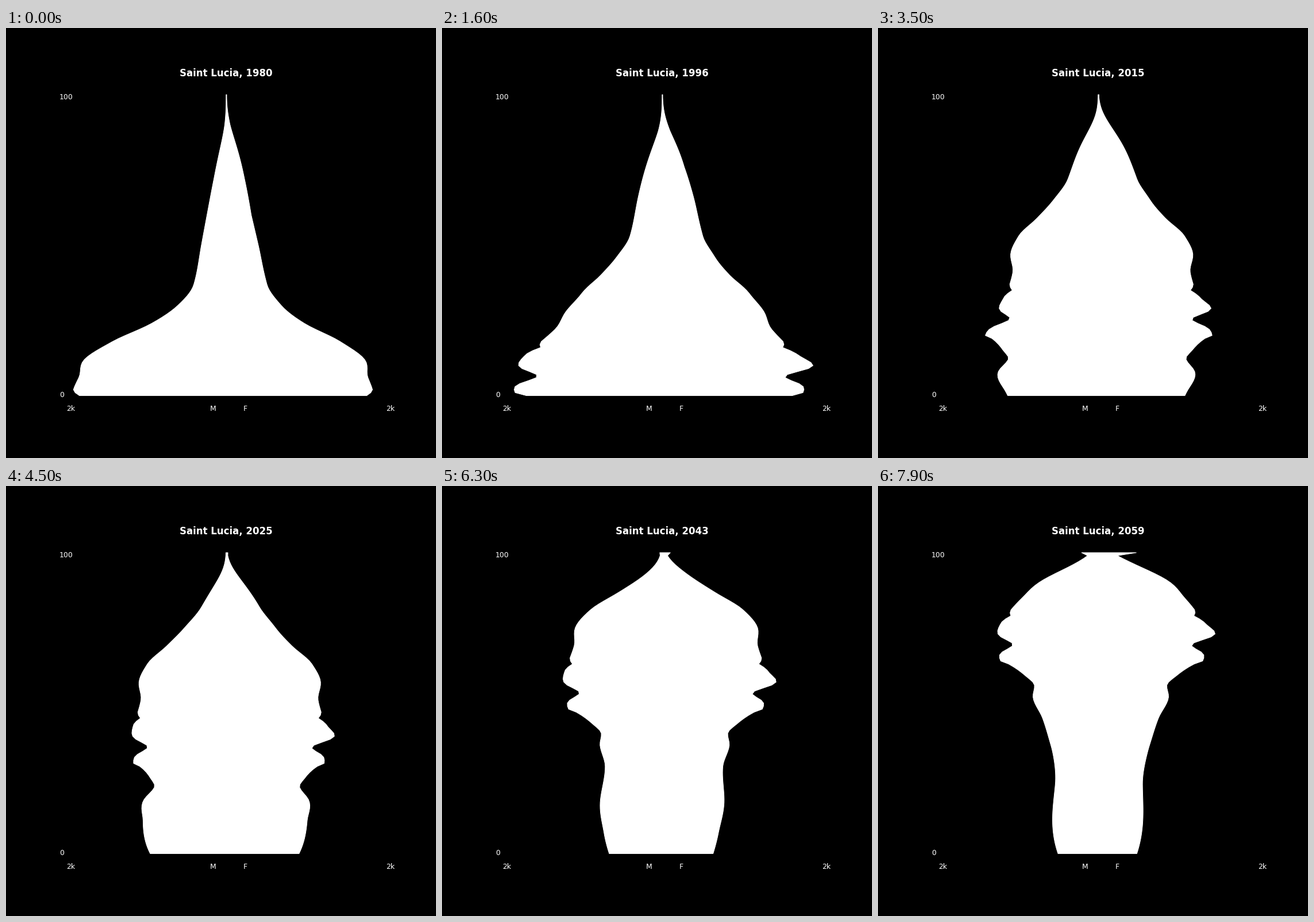
These frames come from a looping animation (748x748 px, 8 s). A matplotlib script:

```python
import numpy as np
import matplotlib.pyplot as plt
from matplotlib.animation import FuncAnimation

SIZE, DPI = 748, 100
FIRST, YEARS, STEP_MS = 1980, 80, 100
MID = 383.3                   # x of the axis between the sexes
Y0, DY = 639.55, 5.236        # y of age 0, pixels per year of age
AGES = np.arange(111)         # ages from 100 on share one open group
LEVELS = Y0 - DY * np.arange(101)

# Boys born per year, in pixels of width
BIRTHS = np.array([
    (1890, 26), (1910, 48), (1930, 80), (1943, 104), (1950, 147), (1956, 198),
    (1962, 256), (1968, 278), (1974, 264), (1985, 273), (1995, 256),
    (1996, 236), (2000, 195), (2003, 175), (2007, 183), (2014, 160),
    (2025, 132), (2036, 100), (2059, 63)], float)


def smooth(x, xp, fp):
    """Monotone cubic interpolation."""
    h = np.diff(xp)
    d = np.diff(fp) / h
    m = np.empty(len(xp))
    m[0], m[-1] = d[0], d[-1]
    same = d[:-1] * d[1:] > 0
    total = np.where(same, d[:-1] + d[1:], 1)
    m[1:-1] = np.where(same, 2 * d[:-1] * d[1:] / total, 0)
    i = np.clip(np.searchsorted(xp, x, "right") - 1, 0, len(h) - 1)
    s = (x - xp[i]) / h[i]
    return ((1 + 2 * s) * (1 - s) ** 2 * fp[i] + s * (1 - s) ** 2 * h[i] * m[i]
            + s * s * (3 - 2 * s) * fp[i + 1] - s * s * (1 - s) * h[i] * m[i + 1])


def bump(x, center, spread):
    return np.exp(-0.5 * ((x - center) / spread) ** 2)


def births(born, female):
    size = smooth(np.maximum(born, BIRTHS[0, 0]), *BIRTHS.T)
    size = size - 46 * bump(born, 1989.5, 1.6) - 14 * bump(born, 1980, 0.7)
    if not female:
        return size
    older = 0.18 / (1 + np.exp((born - 1948) / 3))
    oldest = 0.01 * np.clip(1920 - born, 0, 30)
    return size * (0.955 + 0.08 * bump(born, 1986.3, 2) + older + oldest)


def staying(born, female):
    """Share left after emigration between birth and age 36."""
    floor = 0.54 + 0.07 * bump(born, 1990, 10.6) + 0.07 * female
    young = (1 + np.cos(np.pi * np.minimum(AGES, 36) / 36)) / 2
    return floor + (1 - floor) * young


def survival(born, female):
    """Gompertz curve whose typical age at death rises by cohort."""
    typical = np.maximum(93.8 + 0.15 * (born - 1960), 86) + 2 * female
    return np.exp(-np.exp(0.139 * (AGES - typical)))


def widths(year, female):
    born = year - AGES
    inflow = np.exp(0.003 * max(year - 2025, 0))
    w = births(born, female) * staying(born, female) * survival(born, female)
    return inflow * np.append(w[:100], w[100:].sum())


fig = plt.figure(figsize=(SIZE / DPI, SIZE / DPI), dpi=DPI, facecolor="black")
ax = fig.add_axes([0, 0, 1, 1])
ax.set(xlim=(0, SIZE), ylim=(SIZE, 0))
ax.axis("off")
plt.rcParams["font.family"] = "DejaVu Sans"

shape, = ax.fill([MID], [Y0], fc="white", ec="white", lw=0.7, joinstyle="round")
title = ax.text(MID - 0.7, 84, "", color="white", size=12, weight="bold", ha="center")
for x, y, label in [(93, 124, "100"), (93, 642, "0"), (105, 666, "2k"),
                    (354.4, 666, "M"), (412.3, 666, "F"), (661.6, 666, "2k")]:
    ax.text(x, y, label, color="white", size=9)


def draw(i):
    year = FIRST + i
    left, right = MID - 0.4 - widths(year, False), MID + 0.4 + widths(year, True)
    shape.set_xy(np.column_stack([np.append(left, right[::-1]),
                                  np.append(LEVELS, LEVELS[::-1])]))
    title.set_text(f"Saint Lucia, {year}")
    return shape, title


anim = FuncAnimation(fig, draw, frames=YEARS, interval=STEP_MS,
                     repeat=True, repeat_delay=0)
plt.show()
```
